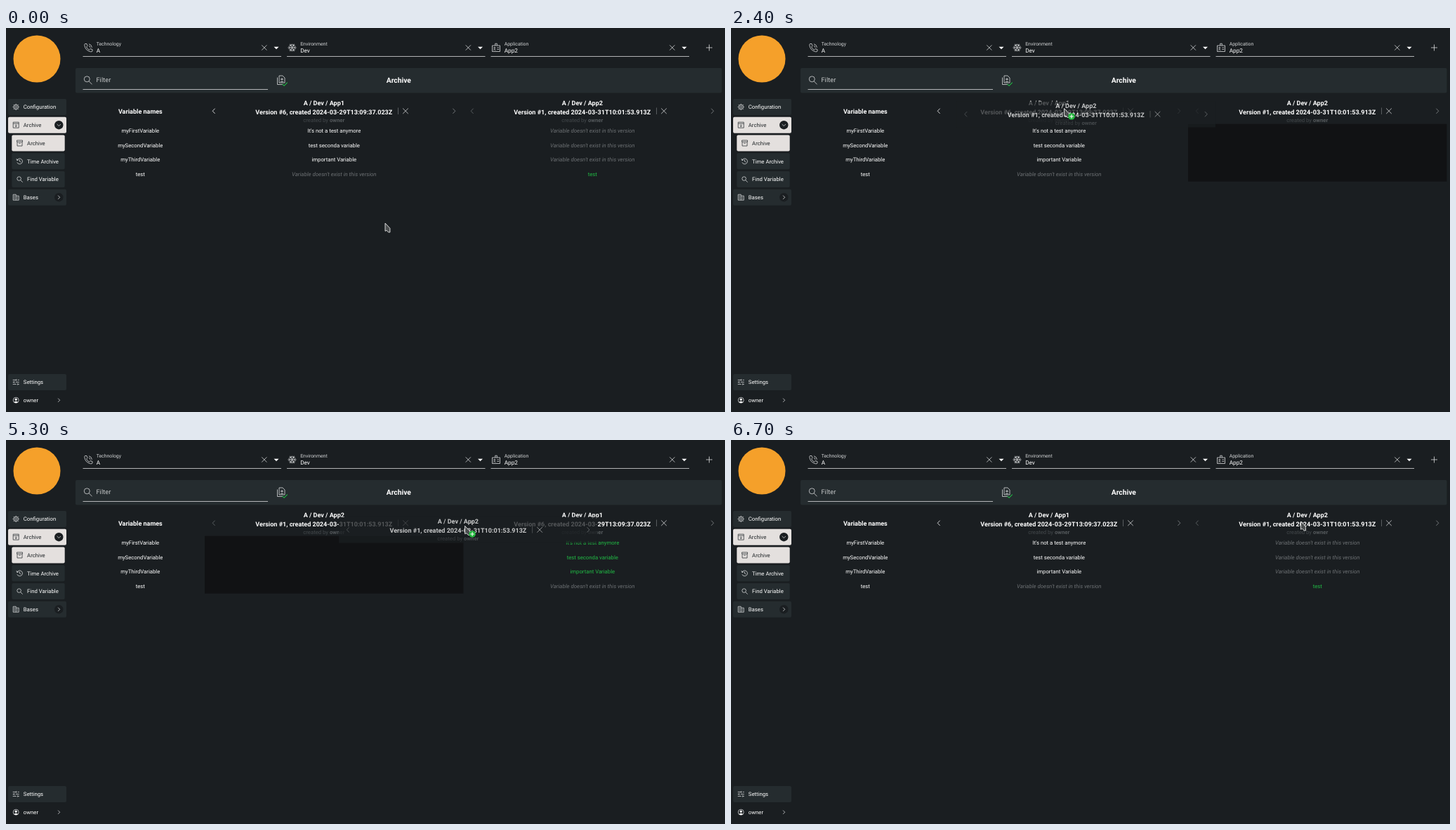
Recreate the animation shown at these times as an HTML page. Size 1024 px wide and 547 px high, loop 7000 ms.

```html
<!DOCTYPE html>
<html lang="en">
<head>
<meta charset="utf-8">
<title>Archive</title>
<style>
  html, body { margin: 0; width: 100%; height: 100%; overflow: hidden; background: #1a1e21; }
  svg { display: block; width: 100vw; height: 100vh; font: 7.74px Roboto, sans-serif; fill: #fff;
    cursor: default; text-rendering: geometricPrecision; }
  .line { fill: none; stroke: #d8dadb; stroke-width: .8; }
  .dark .line { stroke: #33383b; }
  .dark text { fill: #22272a; }
  .panel { fill: #252c2f; }
  .light { fill: #e4e0de; }
  .label { font-size: 6.9px; fill: #d3d5d6; }
  .value { font-size: 8.2px; }
  .mid { text-anchor: middle; }
  .bold { font-size: 9.03px; font-weight: 700; }
  .title { font-size: 10.3px; font-weight: 700; }
  .none { font-size: 7.85px; font-style: italic; fill: #6c7073; }
  .new { fill: #21ba45; }
  .by { fill: #44494c; }
  .by tspan { font-weight: 700; fill: #54595c; }
</style>
</head>
<body>
<svg viewBox="0 0 1024 547" preserveAspectRatio="none">
  <rect width="1024" height="547" fill="#1a1e21"/>
  <circle cx="44" cy="44" r="33.5" fill="#f5a02a"/>
  <g id="fields"></g>
  <path class="line" d="M1001.5 23.5v9M997 28h9"/>

  <rect class="panel" x="99" y="57" width="920.5" height="35.5" rx="2"/>
  <g class="line">
    <circle cx="115.3" cy="72.8" r="4"/>
    <path d="M118.2 75.8L122.5 80.3M109.5 87.5H373"/>
    <path d="M389 68h5l3 3v7h-8zM386.5 70.5V80.5h8M393 71v4M391 73h4M391 76.5h4"/>
    <path d="M393.5 79.8l2.6 2.5 4.6-4.7" style="stroke:#21ba45;stroke-width:1.1"/>
  </g>
  <text x="128.5" y="77.4" style="font-size:9.1px;letter-spacing:.08px;fill:#c9cbcc">Filter</text>
  <text class="mid title" x="559.3" y="77.9">Archive</text>

  <g id="menu"></g>
  <g id="names"></g>
  <g id="live"></g>
</svg>
<script>
const $ = id => document.getElementById(id);
const text = (x, y, cls, s) => `<text x="${x}" y="${y}" class="${cls}">${s}</text>`;
const line = (d, extra = '') => `<path class="line" d="${d}" ${extra}/>`;
const at = (x, y, body, extra = '') => `<g transform="translate(${x} ${y})" ${extra}>${body}</g>`;
const ring = (x, y, r) => `<circle class="line" cx="${x}" cy="${y}" r="${r}"/>`;
const chevron = (x, y, dir, color) =>
  line(`M${x - dir * 1.6} ${y - 3.6}l${dir * 3.4} 3.6l${-dir * 3.4} 3.6`, `style="stroke:${color}"`);
const cross = (x, y, r) => line(`M${x - r} ${y - r}l${2 * r} ${2 * r}m0 ${-2 * r}l${-2 * r} ${2 * r}`);

// Icons are drawn around their own centre
const icons = {
  phone: line('M-4.5-5.5h2.5l1 3-1.5 1.5q1.5 3 4 4.2l1.5-1.6 3 1v2.4q-1 1-2.5.8-8-2-8.7-9.5q0-1.2.7-1.8zM1-5.2q4 1 4.4 5M1-2.7q1.8.5 2 2.5'),
  snow: [0, 60, 120].map(a => line('M0-6V6M-2-4.8L0-3 2-4.8M-2 4.8L0 3 2 4.8', `transform="rotate(${a + 30})"`)).join(''),
  badge: line('M-5.5-3H5.5V5.5H-5.5zM-1.3-3V-5.8H1.3V-3M1.5 0h2.7M1.5 2.5h2.7M-4 3.6q1.7-2 3.4 0') + ring(-2.3, .4, 1),
  gear: ring(0, 0, 1.5) + ring(0, 0, 3.3) +
    [0, 45, 90, 135].map(a => line('M0-4.6v1.2M0 4.6v-1.2', `transform="rotate(${a})"`)).join(''),
  inbox: line('M-4-4H4V4H-4zM-4-2H4M0-.8V2.4M-1.5 1L0 2.4 1.5 1'),
  box: line('M-4-4H4V-1.8H-4zM-3.5-1.8V4H3.5V-1.8M-1.3.2h2.6'),
  history: line('M-3.6-1.4a3.9 3.9 0 1 1 0 3M-4.5-3.6l.7 2.3 2.3-.5M0-2.2V.3l1.8 1'),
  find: ring(-.9, -.9, 2.8) + line('M1.2 1.2L4.2 4.2'),
  bases: line('M-4-4H0V4H-4zM0-2H4V4H0M-2.8-2h1.6M-2.8 0h1.6M-2.8 2h1.6M1.3 0h1.4M1.3 2h1.4'),
  sliders: line('M-4.5-3h5M2.5-3h2M-4.5 0h2M-.5 0h5M-4.5 3h5M2.5 3h2M.5-4.2v2.4M-2.5-1.2v2.4M2.5 1.8v2.4'),
  person: ring(0, 0, 4) + '<path fill="#fff" d="M-2.8 2.7q2.8-2.4 5.6 0q-2.8 2-5.6 0"/><circle cy="-1" r="1.6"/>'
};

$('fields').innerHTML = [
  ['Technology', 'A', 'phone'], ['Environment', 'Dev', 'snow'], ['Application', 'App2', 'badge']
].map(([label, value, icon], i) => at(109.5 + i * 290.5, 0,
  at(7.5, 28, icons[icon]) + text(19.2, 25, 'label', label) + text(19.2, 34.9, 'value', value) +
  cross(258.3, 28, 3.6) + '<path d="M272 26.7h7l-3.5 3.6z"/>' + line('M0 40.5H282.5'))).join('');

// label, centre y, icon, indent, look, chevron
$('menu').innerHTML = [
  ['Configuration', 112.5, 'gear', 0, 'panel'],
  ['Archive', 138.2, 'inbox', 0, 'light', 'down'],
  ['Archive', 164, 'box', 1, 'light'],
  ['Time Archive', 189.8, 'history', 1, 'panel'],
  ['Find Variable', 215.5, 'find', 1, 'panel'],
  ['Bases', 241.2, 'bases', 0, 'panel', 'right'],
  ['Settings', 504.4, 'sliders', 0, 'panel'],
  ['owner', 530.2, 'person', 0, '', 'right']
].map(([label, y, icon, sub, look, arrow]) => {
  const x = sub ? 8.3 : 3, w = sub ? 75.4 : 83;
  const back = look && `<rect class="${look}" x="${x}" y="-11.5" width="${w}" height="23" rx="2"/>`;
  const knob = arrow ? at(75.3, 0, (look ? '<circle r="6.2" fill="#1a1e21"/>' : '') +
    line('M-1.2-2.6L1.4 0-1.2 2.6', `style="stroke:#d8dadb" transform="rotate(${arrow === 'down' ? 90 : 0})"`)) : '';
  return at(0, y, back + at(x + 11.2, 0, icons[icon]) + text(x + 21.8, 2.7, '', label) + knob,
    look === 'light' ? 'class="dark"' : '');
}).join('');

const rowY = i => 149.2 + i * 20.6;
$('names').innerHTML = text(191.3, 121.6, 'mid bold', 'Variable names') +
  ['myFirstVariable', 'mySecondVariable', 'myThirdVariable', 'test']
    .map((s, i) => text(191.3, rowY(i), 'mid', s)).join('');

const apps = [
  { name: 'App1', version: 'Version #6, created 2024-03-29T13:09:37.023Z', older: true,
    rows: ["It's not a test anymore", 'test seconda variable', 'important Variable', ''] },
  { name: 'App2', version: 'Version #1, created 2024-03-31T10:01:53.913Z', older: false,
    rows: ['', '', '', 'test'] }
];
const colX = [283, 651], colW = 368.4;

const head = app => chevron(13, 118.3, -1, app.older ? '#fff' : '#686c6f') +
  text(169.8, 109.8, 'mid bold', `A / Dev / ${app.name}`) +
  text(169.8, 122.6, 'mid bold', app.version) +
  text(169.8, 133.8, 'mid by', 'created by <tspan>owner</tspan>') +
  line('M275.5 113.5v9.5', 'style="stroke:#6a6e70"') + cross(286, 118.3, 3.8) +
  chevron(355, 118.3, 1, '#8b8f91');

const cells = (app, col) => app.rows.map((s, i) =>
  text(184.3, rowY(i), 'mid ' + (s ? (col ? 'new' : '') : 'none'), s || "Variable doesn't exist in this version")).join('');

const ghost = (app, x, y) => at(x, y,
  `<rect y="100" width="${colW}" height="37" fill="#1a1e21"/>` + head(app), 'opacity=".75"');

const arrow = '<path d="M0 0V11.3L2.2 10.3 4.6 13H6.9V7.3Z" fill="#4c4f50" stroke="#e6e6e6" stroke-width=".9"/>';
const pointers = {
  arrow,
  copy: arrow + '<circle cx="10.5" cy="11.5" r="4.8" fill="#22b53c"/>' +
    '<path d="M10.5 8.7v5.6M7.7 11.5h5.6" stroke="#fff" stroke-width="1.1"/>',
  beam: '<path d="M-2.8-7q2.2 0 2.8 1.2q.6-1.2 2.8-1.2M0-5.8V5.8M-2.8 7q2.2 0 2.8-1.2q.6 1.2 2.8 1.2" fill="none" stroke="#f2f2f2"/>',
  fist: '<rect x="-4" y="-4.3" width="8.2" height="8.8" rx="2" fill="#5a5d5e" stroke="#c8c8c8" stroke-width="1" stroke-dasharray="1.5 .7"/>'
};

const clamp = v => Math.min(1, Math.max(0, v));
const ease = v => v * v * (3 - 2 * v);
// time span, end point; the pointer rests between spans
const moves = [
  [200, 1000, 803.5, 111.5], [1000, 1100, 804.5, 110.5],
  [1600, 2400, 474.5, 114.5], [3300, 3400, 475.5, 114.5],
  [3700, 4200, 463.5, 118], [4900, 5600, 777, 125.3],
  [5600, 6000, 811.5, 116]
];
function pointerAt(t) {
  let x = 540, y = 278;
  for (const [from, to, ex, ey] of moves) {
    const k = ease(clamp((t - from) / (to - from)));
    x += (ex - x) * k;
    y += (ey - y) * k;
  }
  return [x, y];
}
function pointerKind(t) {
  if (t < 900) return 'arrow';
  if (t < 1600) return 'beam';
  if (t < 1700) return 'fist';
  if (t < 2800) return 'copy';
  if (t < 3400) return 'arrow';
  if (t < 4900) return 'beam';
  if (t < 5000) return 'fist';
  return t < 6100 ? 'copy' : 'arrow';
}

const drags = [
  { from: 1600, drop: 2800, col: 1, grab: [804, 110], fade: 700 },
  { from: 4900, drop: 6100, col: 0, grab: [462.5, 112.8], fade: 400 }
];

function draw(t) {
  const [px, py] = pointerAt(t);
  const swapped = t >= drags[0].drop && t < drags[1].drop;
  const order = swapped ? [apps[1], apps[0]] : apps;
  const drag = drags.find(d => t >= d.from && t < d.drop);
  const last = drags.filter(d => t >= d.drop).pop();
  const shown = last ? clamp((t - last.drop + 100) / last.fade) : 1;
  const settle = t >= drags[1].drop ? .7 + .3 * clamp((t - 6400) / 300) : 1;

  let out = order.map((app, col) => {
    const held = drag && drag.col === col;
    const shade = held ? clamp((t - drag.from) / 300) : 0;
    const body = held
      ? `<rect y="136.7" width="${colW}" height="82" fill="#111214" opacity="${shade}"/>`
      : `<g opacity="${shown}">${cells(app, col)}</g>`;
    return at(colX[col], 0, `<g opacity="${col ? settle : 1}">${head(app)}</g>` + body);
  }).join('');

  if (drag && t > drag.from)
    out += ghost(order[drag.col], colX[drag.col] + px - drag.grab[0], py - drag.grab[1]);
  $('live').innerHTML = out + at(px, py, pointers[pointerKind(t)]);
}

const LOOP = 7000, STEP = 100;
let shownStep = -1, start = performance.now();
function tick(now) {
  const step = Math.floor(Math.max(0, now - start) % LOOP / STEP);
  if (step !== shownStep) draw((shownStep = step) * STEP);
  requestAnimationFrame(tick);
}
tick(start);
</script>
</body>
</html>
```
